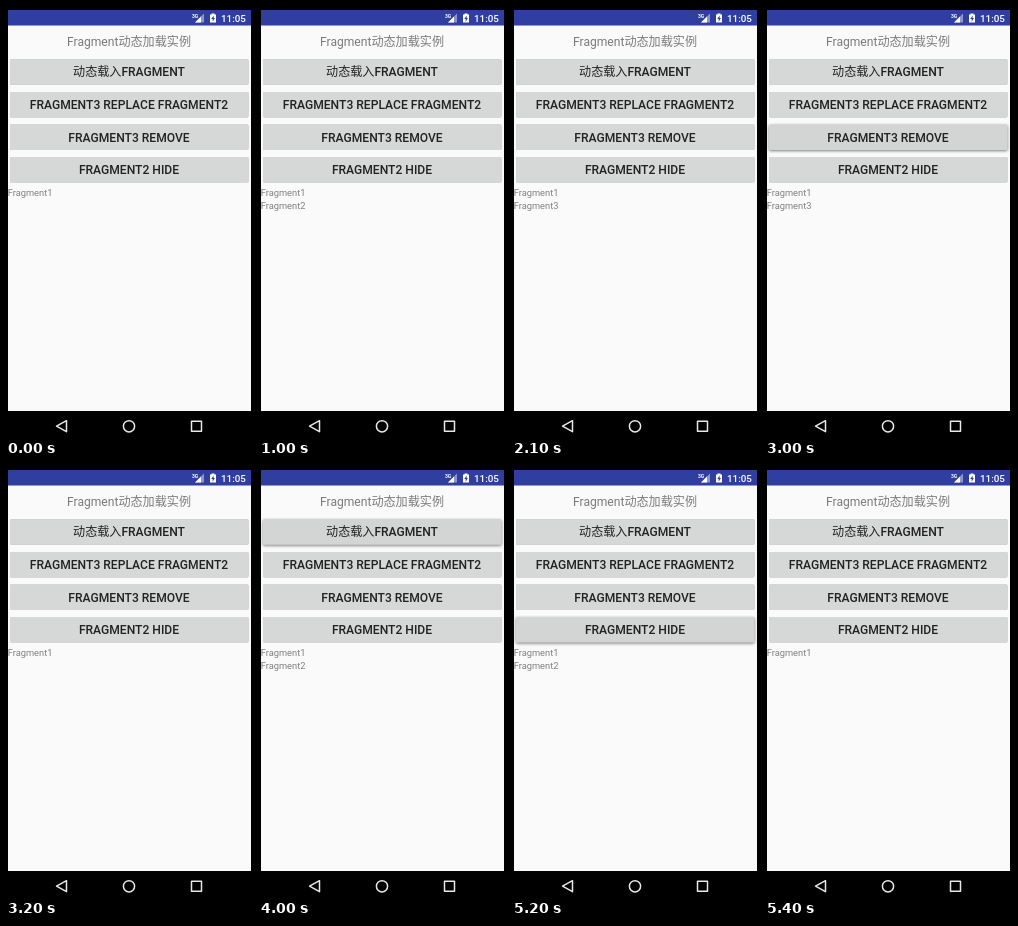
These frames come from a looping animation (247x432 px, 6.5 s). An HTML page:

```html
<!DOCTYPE html>
<html lang="zh">
<head>
<meta charset="utf-8">
<title>Fragment</title>
<style>
  html, body { margin: 0; width: 100%; height: 100%; overflow: hidden; background: #000; }
  svg { display: block; width: 100vw; height: 100vh; }
  text { font-family: Roboto, "Noto Sans CJK SC", "Noto Sans CJK", sans-serif; }
  .title { font-size: 12.1px; fill: #7b7b7b; text-anchor: middle; }
  .label { font-size: 12.1px; font-weight: 500; fill: #222; text-anchor: middle; }
  .item { font-size: 9.3px; fill: #808080; }
  .clock { font-size: 9.8px; font-weight: 500; fill: #fff; }
  .face { fill: #d6d7d7; filter: drop-shadow(0 .8px .7px rgba(0, 0, 0, .3)); }
  .pressed .face { fill: #d3d4d4; filter: drop-shadow(0 1px 1.6px rgba(0, 0, 0, .5)); }
</style>
</head>
<body>
<svg viewBox="0 0 247 432">
  <rect width="247" height="432"/>
  <rect x="2" y="4" width="243" height="401" fill="#fafafa"/>
  <rect x="2" y="4" width="243" height="15.5" fill="#303f9f"/>

  <g fill="#fff">
    <text x="186" y="11.5" font-size="5" font-weight="700">3G</text>
    <path d="M198 7.5V16.5H189Z" opacity=".45"/>
    <path d="M195 10.5V16.5H189Z"/>
    <path d="M205.5 7.5h3v1h1.5v8h-6v-8h1.5z"/>
    <path d="M207.6 9.5l-2.3 3.6h1.4v2.6l2.2-3.6h-1.3z" fill="#303f9f"/>
    <text class="clock" x="215" y="15.6">11:05</text>
  </g>

  <text class="title" x="123" y="39.5">Fragment动态加载实例</text>
  <g id="buttons"></g>
  <text class="item" x="1.7" y="190">Fragment1</text>
  <text class="item" id="second" x="1.7" y="202.7"></text>

  <g fill="none" stroke="#e8e8e8" stroke-width="1.5" stroke-linejoin="round">
    <path d="M60.5 414.7V425.7L50.5 420.2Z"/>
    <circle cx="123" cy="420.3" r="5.6"/>
    <rect x="185.5" y="415.3" width="10" height="10"/>
  </g>
</svg>
<script>
const LOOP = 6500;
const LABELS = ["动态载入FRAGMENT", "FRAGMENT3 REPLACE FRAGMENT2", "FRAGMENT3 REMOVE", "FRAGMENT2 HIDE"];

// [start in ms, text of the second line, pressed button or -1]
const STEPS = [
  [0, "", -1],
  [600, "Fragment2", 0],
  [700, "Fragment2", -1],
  [1700, "Fragment2", 1],
  [1800, "Fragment3", 1],
  [1900, "Fragment3", -1],
  [3000, "Fragment3", 2],
  [3100, "", 2],
  [3200, "", -1],
  [4000, "Fragment2", 0],
  [4100, "Fragment2", -1],
  [5200, "Fragment2", 3],
  [5300, "", 3],
  [5400, "", -1]
];

const second = document.getElementById("second");
const group = document.getElementById("buttons");
group.innerHTML = LABELS.map((label, i) => `
  <g transform="translate(0 ${53.3 + i * 32.6})">
    <rect class="face" x="4" width="238.5" height="25.5" rx="1.4"/>
    <text class="label" x="123" y="17.2">${label}</text>
  </g>`).join("");
const buttons = [...group.children];

let shown;
function draw() {
  const time = performance.now() % LOOP;
  const step = STEPS.findLast(([start]) => start <= time);
  if (step !== shown) {
    shown = step;
    second.textContent = step[1];
    buttons.forEach((button, i) => button.classList.toggle("pressed", i === step[2]));
  }
  requestAnimationFrame(draw);
}
draw();
</script>
</body>
</html>
```
